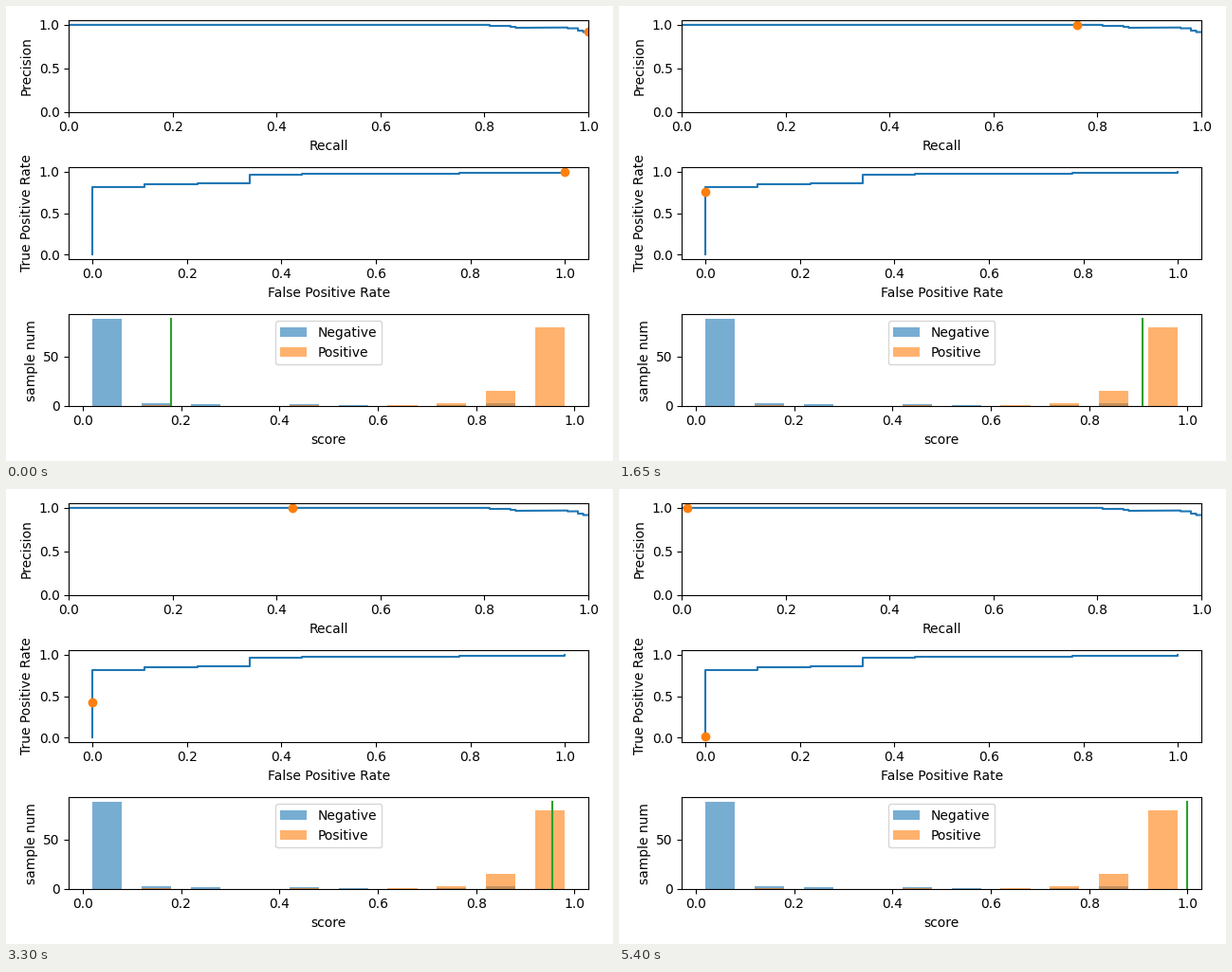
These frames come from a looping animation (640 by 480 pixels, 5450 ms). A matplotlib script:

```python
import numpy as np
import matplotlib.pyplot as plt
from matplotlib.animation import FuncAnimation

INTERVAL = 50
N_POS = 100

# Positive scores fall off with rank: a plateau near 1, then a sparse tail
RANK_KEYS = [1, 10, 21, 31, 43, 54, 65, 76, 79, 86, 94, 95, 97, 98, 99, 100]
SCORE_KEYS = [1, 0.9992, 0.991, 0.9762, 0.955, 0.937, 0.9195, 0.908,
              0.9015, 0.878, 0.81, 0.79, 0.71, 0.65, 0.43, 0.18]
pos = np.interp(np.arange(1, N_POS + 1), RANK_KEYS, SCORE_KEYS)

# A few negatives score high, the rest sit near zero
hard = np.array([0.893, 0.88, 0.874, 0.73, 0.55, 0.47, 0.45, 0.27, 0.22])
neg = np.concatenate([hard, np.linspace(0.12, 0.16, 3), np.linspace(0, 0.09, 88)])

# Rank the samples down to the last positive
scores = np.concatenate([pos, hard])
order = np.argsort(-scores)
threshold = scores[order]
hit = order < N_POS
total = len(scores)

tp = np.concatenate([[0], np.cumsum(hit)])
fp = np.arange(total + 1) - tp
recall, fpr = tp / N_POS, fp / len(hard)
precision = np.ones(total + 1)
precision[1:] = tp[1:] / np.arange(1, total + 1)

fig, (ax_pr, ax_roc, ax_hist) = plt.subplots(3, 1, figsize=(6.4, 4.8), dpi=100)


def curve(ax, x, y, xlabel, ylabel):
    ax.plot(x, y)
    ax.set(xlabel=xlabel, ylabel=ylabel)
    return ax.plot(x[-1:], y[-1:], "o")[0]


def bars(values, label):
    counts, edges = np.histogram(values, bins=10, range=(0, 1))
    ax_hist.bar(edges[:-1] + 0.05, counts, width=0.06, alpha=0.6, label=label)
    return counts.max()


pr_dot = curve(ax_pr, recall, precision, "Recall", "Precision")
ax_pr.set(xlim=(0, 1), ylim=(0, 1.05))
roc_dot = curve(ax_roc, fpr, recall, "False Positive Rate", "True Positive Rate")

top = max(bars(neg, "Negative"), bars(pos, "Positive"))
ax_hist.set(xlabel="score", ylabel="sample num",
            xlim=(-0.028, 1.028), ylim=(0, top * 1.05))
cut, = ax_hist.plot([threshold[-1]] * 2, [0, top], color="C2")
ax_hist.legend(loc="upper center")

fig.tight_layout()


def update(i):
    n = total - i
    pr_dot.set_data([recall[n]], [precision[n]])
    roc_dot.set_data([fpr[n]], [recall[n]])
    cut.set_xdata([threshold[n - 1]] * 2)
    return pr_dot, roc_dot, cut


anim = FuncAnimation(fig, update, frames=total, interval=INTERVAL,
                     repeat=True, repeat_delay=0)
plt.show()
```
